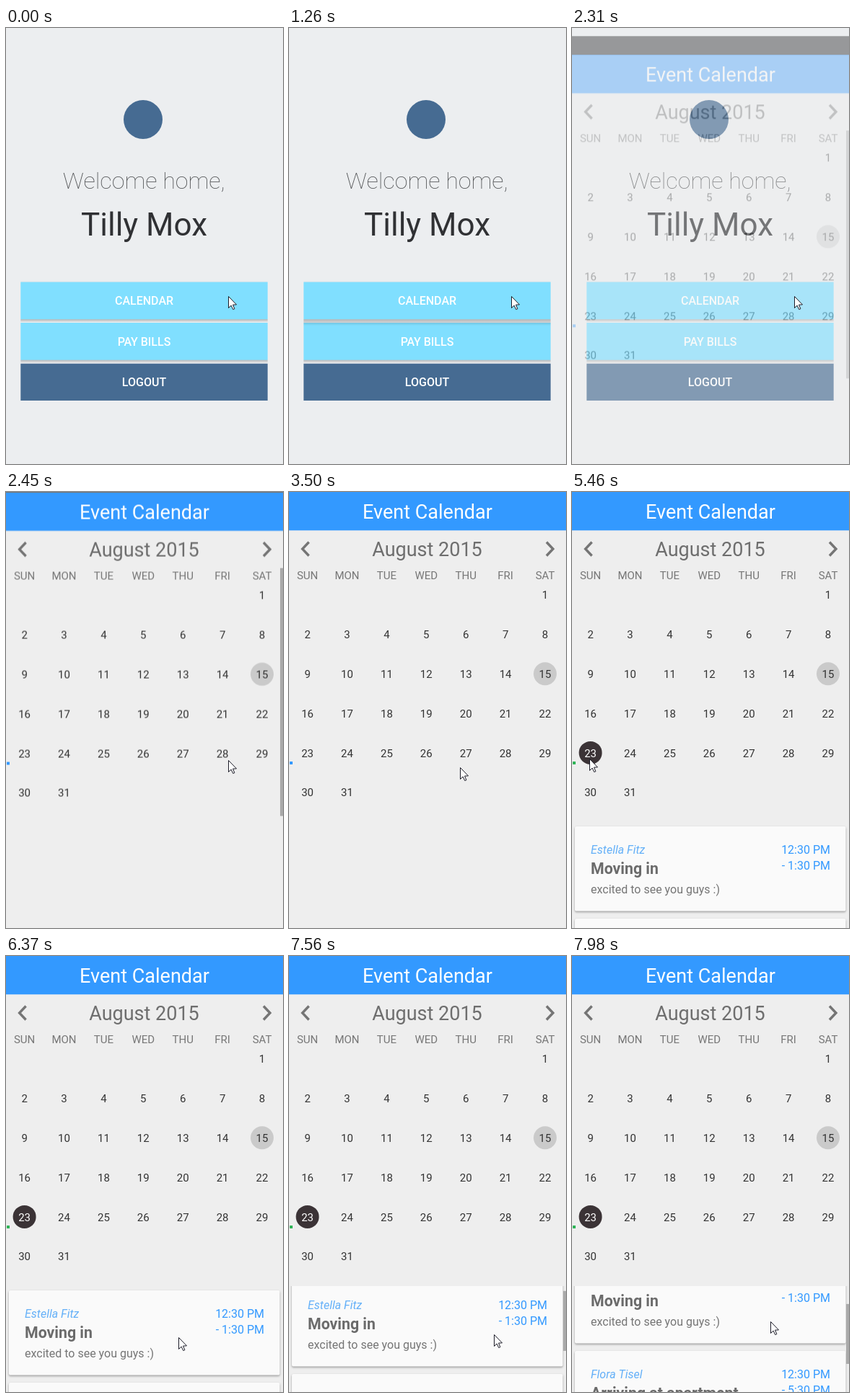
Animation, 384 px wide and 605 px high, one loop 8 s. Source, as an HTML page with a canvas:

```html
<!DOCTYPE html>
<html lang="en">
<head>
<meta charset="utf-8">
<title>Event calendar</title>
<style>
  html, body { margin: 0; width: 100%; height: 100%; overflow: hidden; background: #eceef0; }
  canvas { display: block; width: 384px; height: 605px; }
</style>
</head>
<body>
<canvas id="stage" width="384" height="605"></canvas>
<script>
const W = 384, H = 605, LOOP = 8000, TICK = 70;
const BLUE = '#3399ff', GREY = '#6e6e6e';
const BTN_X = 20.3, BTN_W = 342.4;
const COL = 54.9, ROW = 54.8;
const LIST_TOP = 458, CONTENT = 260, SLOP = 8;

const stage = document.getElementById('stage').getContext('2d');
const page = document.createElement('canvas');
page.width = W;
page.height = H;
const sheet = page.getContext('2d');

const clamp = v => Math.max(0, Math.min(1, v));
const smooth = p => p * p * (3 - 2 * p);

// Pointer moves: start, end, target x, target y, downward bow.
const moves = [
  [3290, 3570, 224, 384, 0],
  [3850, 4480, 24, 371, 12],
  [4550, 4620, 24, 370, 0],
  [5670, 6370, 239, 529, 0],
  [6580, 6930, 287, 545, 0],
  [7350, 7840, 280, 493, 0],
  [7910, 7980, 275, 507, 0]
];

function pointerAt(t) {
  let x = 308, y = 372;
  for (const [from, to, tx, ty, bow] of moves) {
    if (t <= from) break;
    const p = smooth(clamp((t - from) / (to - from)));
    x += (tx - x) * p;
    y += (ty - y) * p + bow * Math.sin(Math.PI * p);
  }
  return { x: Math.round(x), y: Math.round(y) };
}

function scrollAt(t) {
  return t < 7350 ? 0 : Math.max(0, 545 - SLOP - pointerAt(Math.min(t, 7840)).y);
}

function rect(c, color, x, y, w, h) {
  c.fillStyle = color;
  c.fillRect(x, y, w, h);
}

function disc(c, color, x, y, r) {
  c.fillStyle = color;
  c.beginPath();
  c.arc(x, y, r, 0, Math.PI * 2);
  c.fill();
}

function text(c, str, x, y, size, color, align = 'center', style = '400') {
  c.font = `${style} ${size}px Roboto, sans-serif`;
  c.textAlign = align;
  c.fillStyle = color;
  c.fillText(str, x, y);
}

function shade(c, y, depth) {
  const g = c.createLinearGradient(0, y, 0, y + depth);
  g.addColorStop(0, 'rgba(0,0,0,.24)');
  g.addColorStop(1, 'rgba(0,0,0,0)');
  rect(c, g, BTN_X, y, BTN_W, depth);
}

function drawHome(c, pressed) {
  rect(c, '#eceef0', 0, 0, W, H);
  disc(c, '#466b92', 190, 127, 27);
  text(c, 'Welcome home,', 191.2, 223, 32.2, '#505254', 'center', '100');
  text(c, 'Tilly Mox', 191.5, 288, 44, '#303134');

  rect(c, '#80dfff', BTN_X, 352.5, BTN_W, 51.7);
  rect(c, '#80dfff', BTN_X, 409, BTN_W, 51.7);
  rect(c, '#466b92', BTN_X, 465.7, BTN_W, 51.3);
  shade(c, 404.2, pressed ? 9 : 4.5);
  shade(c, 460.7, 4.5);
  rect(c, 'rgba(0,0,0,.03)', BTN_X, 351.5, BTN_W, 1);
  ['CALENDAR', 'PAY BILLS', 'LOGOUT'].forEach((label, i) =>
    text(c, label, 191.5, 384.2 + i * 56.5, 16, '#fff', 'center', '500'));
}

function chevron(c, x, dir) {
  c.strokeStyle = '#757575';
  c.lineWidth = 3.4;
  c.beginPath();
  c.moveTo(x - dir * 9, 69.5);
  c.lineTo(x, 79);
  c.lineTo(x - dir * 9, 88.5);
  c.stroke();
}

function drawCard(c, y, who, title, note, ends) {
  c.save();
  c.shadowColor = 'rgba(0,0,0,.35)';
  c.shadowBlur = 3;
  c.shadowOffsetY = 1.5;
  c.fillStyle = '#fafafa';
  c.beginPath();
  c.roundRect(4, y, 375.5, 117.5, 2);
  c.fill();
  c.restore();
  text(c, who, 26, y + 38, 16, '#64b0f8', 'left', 'italic 400');
  text(c, title, 26, y + 66, 21.3, '#6b6b6b', 'left', '700');
  text(c, note, 26, y + 93, 16, '#757575', 'left');
  text(c, '12:30 PM', 358, y + 38, 16, BLUE, 'right');
  text(c, ends, 358, y + 60, 16, BLUE, 'right');
}

function drawEvents(c, t) {
  const scroll = scrollAt(t);
  const view = H - LIST_TOP;
  c.save();
  c.globalAlpha = clamp((t - 5040) / 420);
  c.beginPath();
  c.rect(0, LIST_TOP, W, view);
  c.clip();
  drawCard(c, 464 - scroll, 'Estella Fitz', 'Moving in', 'excited to see you guys :)', '- 1:30 PM');
  drawCard(c, 592 - scroll, 'Flora Tisel', 'Arriving at apartment', '', '- 5:30 PM');
  if (scroll > 0) {
    rect(c, '#aaa', 380, LIST_TOP + scroll * view / CONTENT, 4, view * view / CONTENT);
  }
  c.restore();
}

function drawCalendar(c, t) {
  const picked = t >= 5040;
  rect(c, '#eee', 0, 0, W, H);
  rect(c, BLUE, 0, 0, W, 53.3);
  text(c, 'Event Calendar', 192, 36.8, 27, '#fff');
  text(c, 'August 2015', 191.5, 89, 27, GREY);
  chevron(c, 18.6, -1);
  chevron(c, 366, 1);

  ['SUN', 'MON', 'TUE', 'WED', 'THU', 'FRI', 'SAT'].forEach((day, i) =>
    text(c, day, 25.6 + i * COL, 121, 15, '#777'));
  for (let day = 1; day <= 31; day++) {
    const cell = day + 5;
    const x = 25.6 + cell % 7 * COL;
    const y = 143.2 + Math.floor(cell / 7) * ROW;
    const active = picked && day === 23;
    if (day === 15) disc(c, '#cacaca', x, y - 0.5, 16);
    if (active) disc(c, '#3b3336', x, y - 0.5, 16);
    text(c, day, x, y + 5.2, 15, active ? '#fff' : '#333');
  }
  rect(c, picked ? '#2fb457' : BLUE, 1, 374, 4, 4);

  const bar = t < 2660 ? 1 : t < 2800 ? 0.5 : 0;
  rect(c, `rgba(170,170,170,${bar})`, 380, 105, 4, 344);
  if (picked) drawEvents(c, t);
}

function drawPointer(c, { x, y }) {
  c.save();
  c.translate(x + 0.5, y + 0.5);
  c.beginPath();
  [[0, 0], [0, 16], [3.6, 12.5], [6.2, 18], [8.4, 17.2], [6, 11.6], [11, 11.4]]
    .forEach(([px, py]) => c.lineTo(px, py));
  c.closePath();
  c.fillStyle = '#fff';
  c.fill();
  c.strokeStyle = '#1c1c28';
  c.lineWidth = 1;
  c.lineJoin = 'round';
  c.stroke();
  c.restore();
}

function draw(t) {
  const age = t - 2297;
  const alpha = 1 - (1 - clamp(age / 123)) ** 4;
  const offset = 48.4 * (1 - clamp(age / 256)) ** 5;

  if (offset > 0) drawHome(stage, t >= 1260 && t < 2240);
  if (alpha > 0) {
    drawCalendar(sheet, t);
    stage.globalAlpha = alpha;
    rect(stage, '#000', 0, offset - 26, W, 26);
    stage.drawImage(page, 0, offset);
    stage.globalAlpha = 1;
  }
  drawPointer(stage, pointerAt(t));
}

const start = performance.now();
function frame() {
  const t = (performance.now() - start) % LOOP;
  draw(Math.floor(t / TICK) * TICK);
  requestAnimationFrame(frame);
}
frame();
</script>
</body>
</html>
```
